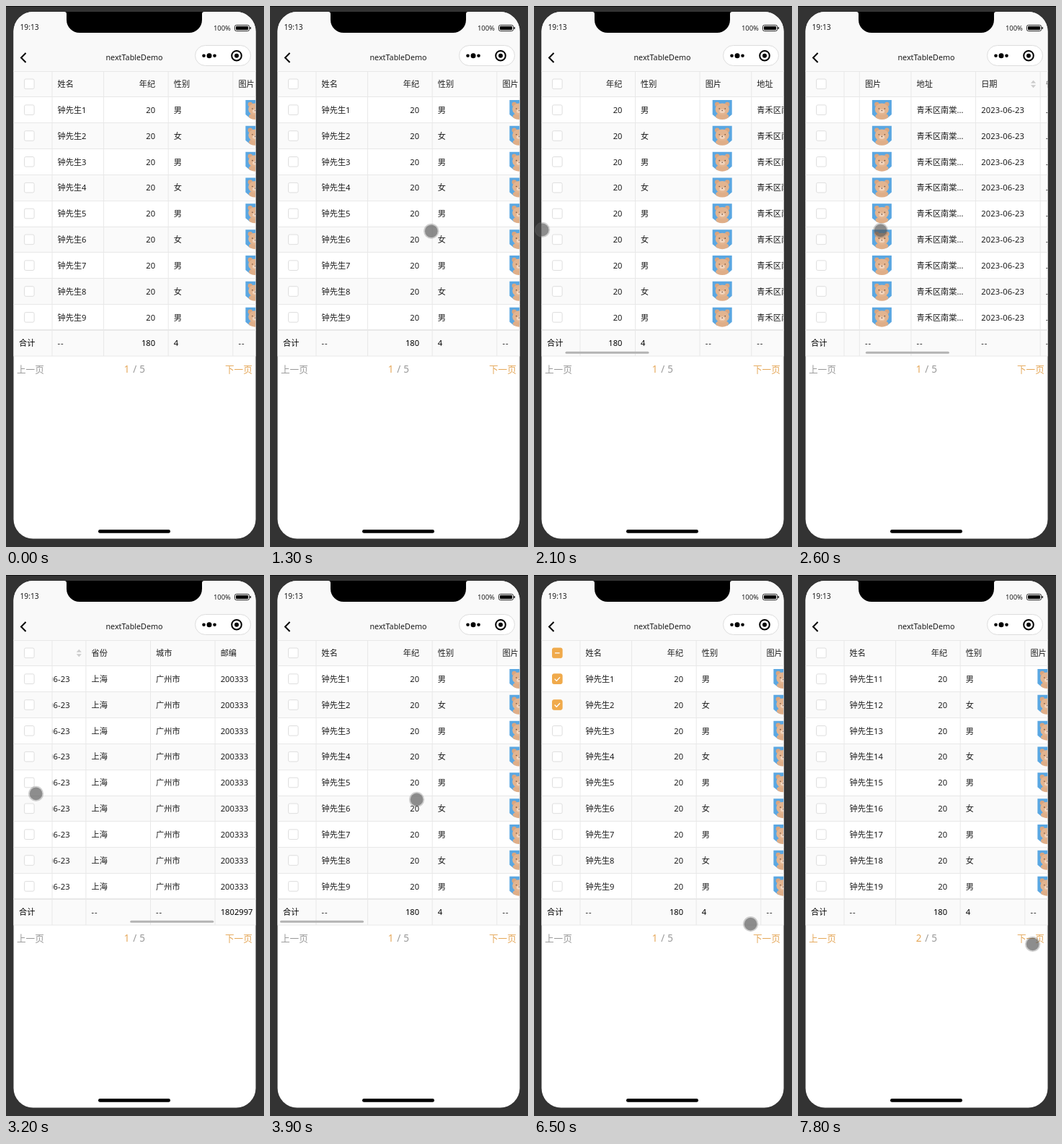
An HTML page for the animation above (8000 ms loop, 358x748 px).

```html
<!DOCTYPE html>
<html lang="zh-CN">
<head>
<meta charset="utf-8">
<title>nextTableDemo</title>
<style>
html, body { margin: 0; width: 100%; height: 100%; overflow: hidden; background: #333; }
svg { display: block; width: 358px; height: 748px; }
text { font-family: "Noto Sans", "Noto Sans CJK SC", "Noto Sans CJK", sans-serif; font-size: 11.2px; fill: #1c1c1c; white-space: pre; }
.line { stroke: #e8e8e8; stroke-width: 1; }
.dash { letter-spacing: .9px; }
.date { letter-spacing: .16px; }
.strong { fill: #000; }
.pager { font-size: 12.6px; fill: #999; }
.num { font-size: 13.5px; text-anchor: middle; }
.hot { fill: #e5a85a; }
</style>
</head>
<body>
<svg viewBox="0 0 358 748">
  <defs>
    <clipPath id="screen"><rect x="10.5" y="8" width="336" height="728.5" rx="27"/></clipPath>
    <clipPath id="view"><rect x="64.3" y="90" width="282.2" height="394"/></clipPath>
    <g id="pic">
      <path d="M0 0H27V20L21 25H6L0 20Z" fill="#5aa7e2"/>
      <ellipse cx="13.5" cy="22.5" rx="9" ry="4.5" fill="#dfae88"/>
      <circle cx="6.5" cy="6" r="3.2" fill="#d9a57f"/>
      <circle cx="20.5" cy="6" r="3.2" fill="#d9a57f"/>
      <ellipse cx="13.5" cy="12.8" rx="9.6" ry="8.2" fill="#e3b48f"/>
      <ellipse cx="13.5" cy="15.5" rx="3.8" ry="2.6" fill="#f0d3bc"/>
      <circle cx="9.5" cy="12" r=".8" fill="#6b4a38"/>
      <circle cx="17.5" cy="12" r=".8" fill="#6b4a38"/>
      <circle cx="13.5" cy="14.6" r=".8" fill="#6b4a38"/>
    </g>
  </defs>
  <rect width="358" height="748" fill="#333"/>
  <rect width="358" height="1" fill="#111"/>
  <g clip-path="url(#screen)">
    <rect x="10" y="8" width="337" height="729" fill="#fff"/>
    <rect x="10" y="8" width="337" height="82" fill="#f9f9f9"/>
    <path d="M81 8Q84 8 84 11V19A18 18 0 0 0 102 37H254A18 18 0 0 0 272 19V11Q272 8 275 8Z" fill="#000"/>
    <text x="19.5" y="33.3" style="font-size:10.2px">19:13</text>
    <text x="288" y="34.3" style="font-size:9.4px">100%</text>
    <rect x="317.5" y="26.5" width="20" height="8" rx="2" fill="#fff" stroke="#222"/>
    <rect x="319" y="28" width="17" height="5" rx=".8" fill="#000"/>
    <rect x="338.5" y="29" width="1.5" height="3" fill="#222"/>
    <path d="M27.5 65L21 71.5L27.5 78" fill="none" stroke="#000" stroke-width="2"/>
    <text x="178" y="74.5" text-anchor="middle" style="font-size:10.75px">nextTableDemo</text>
    <rect x="262.5" y="54.5" width="77" height="28" rx="14" fill="#fff" stroke="#ddd"/>
    <circle cx="274.5" cy="68.7" r="2.3"/><circle cx="282" cy="68.7" r="3.5"/><circle cx="289.5" cy="68.7" r="2.3"/>
    <circle cx="320" cy="68.7" r="6.8" fill="none" stroke="#000" stroke-width="2"/>
    <circle cx="320" cy="68.7" r="3"/>
    <g id="rows"></g>
    <g clip-path="url(#view)"><g id="cells"></g></g>
    <g id="fixed"></g>
    <rect id="bar" y="477.7" width="116" height="3" rx="1.5" fill="#b4b4b4"/>
    <text id="prev" class="pager" x="15" y="507">上一页</text>
    <text id="page" class="pager num hot" x="167.7" y="507">1</text>
    <text class="pager num" x="178.7" y="507">/</text>
    <text class="pager num" x="189.2" y="507">5</text>
    <text class="pager hot" x="304" y="507">下一页</text>
    <rect x="128" y="724" width="100" height="4.8" rx="2.4" fill="#000"/>
  </g>
  <g id="cursor">
    <circle r="10.6" fill="#777" opacity=".35"/>
    <circle r="8.8" fill="#444" opacity=".48"/>
  </g>
</svg>
<script>
const $ = id => document.getElementById(id);
const LOOP = 8000, STEP = 100;
const UNIT = 0.896, LEFT = 64.3, TOP = 89.6, ROW = 40 * UNIT, COUNT = 9;
const ORANGE = '#f0aa4b';

function add(parent, tag, attrs, text) {
  const el = document.createElementNS('http://www.w3.org/2000/svg', tag);
  for (const k in attrs) el.setAttribute(k, attrs[k]);
  if (text !== undefined) el.textContent = text;
  return parent.appendChild(el);
}
const rowMid = i => TOP + ROW * (i + 0.5) + 0.6;
const label = (parent, x, i, text, cls = '', anchor = 'start') =>
  add(parent, 'text', { x, y: rowMid(i) + 3.9, class: cls, 'text-anchor': anchor }, text);

const columns = [
  { title: '姓名', size: 80, value: i => '钟先生' + i },
  { title: '年纪', size: 100, value: () => '20', total: '180', right: true },
  { title: '性别', size: 100, value: i => i % 2 ? '男' : '女', total: '4' },
  { title: '图片', size: 80 },
  { title: '地址', size: 100, value: () => '青禾区南棠...' },
  { title: '日期', size: 100, value: () => '2023-06-23', cls: 'date', sort: true },
  { title: '省份', size: 100, value: () => '上海' },
  { title: '城市', size: 100, value: () => '广州市' },
  { title: '邮编', size: 100, value: () => '200333', total: '1802997' }
];

const rows = $('rows'), cells = $('cells'), fixed = $('fixed');
const last = COUNT + 1;
for (let i = 0; i <= last; i++) {
  add(rows, 'rect', { x: 10, y: TOP + ROW * i, width: 337, height: ROW, fill: i % 2 ? '#fff' : '#fafafa' });
}
for (let i = 0; i <= last + 1; i++) {
  const y = Math.round(TOP + ROW * i) + (i < last ? 0.5 : 0);
  add(rows, 'path', { d: `M10 ${y}H347`, class: 'line', style: i === last ? 'stroke-width:2' : '' });
}

const names = [];
let x = LEFT;
columns.forEach(({ title, size, value, total, right, cls, sort }, c) => {
  const w = size * UNIT;
  const tx = right ? x + w - 18.4 : x + 7.2, anchor = right ? 'end' : 'start';
  label(cells, tx, 0, title, '', anchor);
  for (let i = 1; i <= COUNT; i++) {
    if (value) {
      const el = label(cells, tx, i, value(i), cls, anchor);
      if (c === 0) names.push(el);
    } else {
      add(cells, 'use', { href: '#pic', transform: `translate(${x + 17.2} ${rowMid(i) - 14})` });
    }
  }
  label(cells, tx, last, total || '--', total ? 'strong' : 'dash', anchor);
  if (sort) add(cells, 'path', { d: `M${x + 76} 106.8l3.6-4 3.6 4zm0 2.4l3.6 4 3.6-4z`, fill: '#ccc' });
  x += w;
  add(cells, 'path', { d: `M${x - 0.4} 90V484`, class: 'line' });
});

const boxes = [];
for (let i = 0; i <= COUNT; i++) {
  const g = add(fixed, 'g', { transform: `translate(25 ${rowMid(i) - 7.6})` });
  const box = add(g, 'rect', { x: 0.5, y: 0.5, width: 13.6, height: 13.6, rx: 2 });
  const mark = add(g, 'path', {
    d: i ? 'M3.6 7.3L6.3 10L11 5' : 'M4 7.3H10.6',
    fill: 'none', stroke: '#fff', 'stroke-width': 1.3
  });
  boxes.push({ box, mark });
}
label(fixed, 18, last, '合计', 'strong');
add(fixed, 'path', { d: 'M64 90V484', class: 'line' });

function setBox({ box, mark }, on) {
  box.setAttribute('fill', on ? ORANGE : '#fff');
  box.setAttribute('stroke', on ? ORANGE : '#dedede');
  mark.style.display = on ? '' : 'none';
}

// Eased 0 to 1 between two times
function ramp(t, from, to) {
  const p = Math.max(0, Math.min(1, (t - from) / (to - from)));
  return p * p * (3 - 2 * p);
}

// Two swipes forward, one back
const scrollAt = t =>
  229.5 * ramp(t, 1750, 2600) + 248.6 * ramp(t, 2900, 3270) - 478.1 * ramp(t, 3450, 3900);

// Stops of the pointer: arrival time, x, y, rest
const stops = [
  [400, 143, 344], [600, 170, 312, 100], [850, 143, 310], [1000, 174, 310, 100],
  [1650, 341, 313], [1800, 164, 312], [2100, 12, 309], [2600, 115, 310],
  [2850, 305, 312], [3200, 42, 302, 200], [3900, 204, 310, 100],
  [4700, 34, 147, 300], [5400, 39, 191, 200], [6700, 326, 510]
];
function cursorAt(t) {
  let [free, x, y] = stops[0];
  for (const [time, toX, toY, rest = 0] of stops.slice(1)) {
    const p = ramp(t, free, time);
    x += (toX - x) * p;
    y += (toY - y) * p;
    free = time + rest;
  }
  return [x - 0.4, y + 0.4];
}

let state = '';
function setState(second, row1, row2) {
  const key = [second, row1, row2].join();
  if (key === state) return;
  state = key;
  names.forEach((el, i) => el.textContent = columns[0].value(i + 1 + (second ? 10 : 0)));
  $('page').textContent = second ? 2 : 1;
  $('prev').classList.toggle('hot', second);
  const on = [row1 || row2, row1, row2];
  boxes.forEach((b, i) => setBox(b, on[i]));
}

function draw(now) {
  const time = now % LOOP, t = time - time % STEP;
  const scroll = scrollAt(t);
  cells.setAttribute('transform', `translate(${-scroll} 0)`);
  $('bar').setAttribute('x', 14 + scroll * 0.348);
  $('bar').style.opacity = t < 1800 ? 0 : 1 - ramp(t, 4300, 4600);
  $('cursor').style.display = t < 400 ? 'none' : '';
  $('cursor').setAttribute('transform', `translate(${cursorAt(t)})`);
  const second = t >= 7100;
  setState(second, t >= 5000 && !second, t >= 5600 && !second);
}
const start = performance.now();
function tick() {
  draw(performance.now() - start);
  requestAnimationFrame(tick);
}
tick();
</script>
</body>
</html>
```
